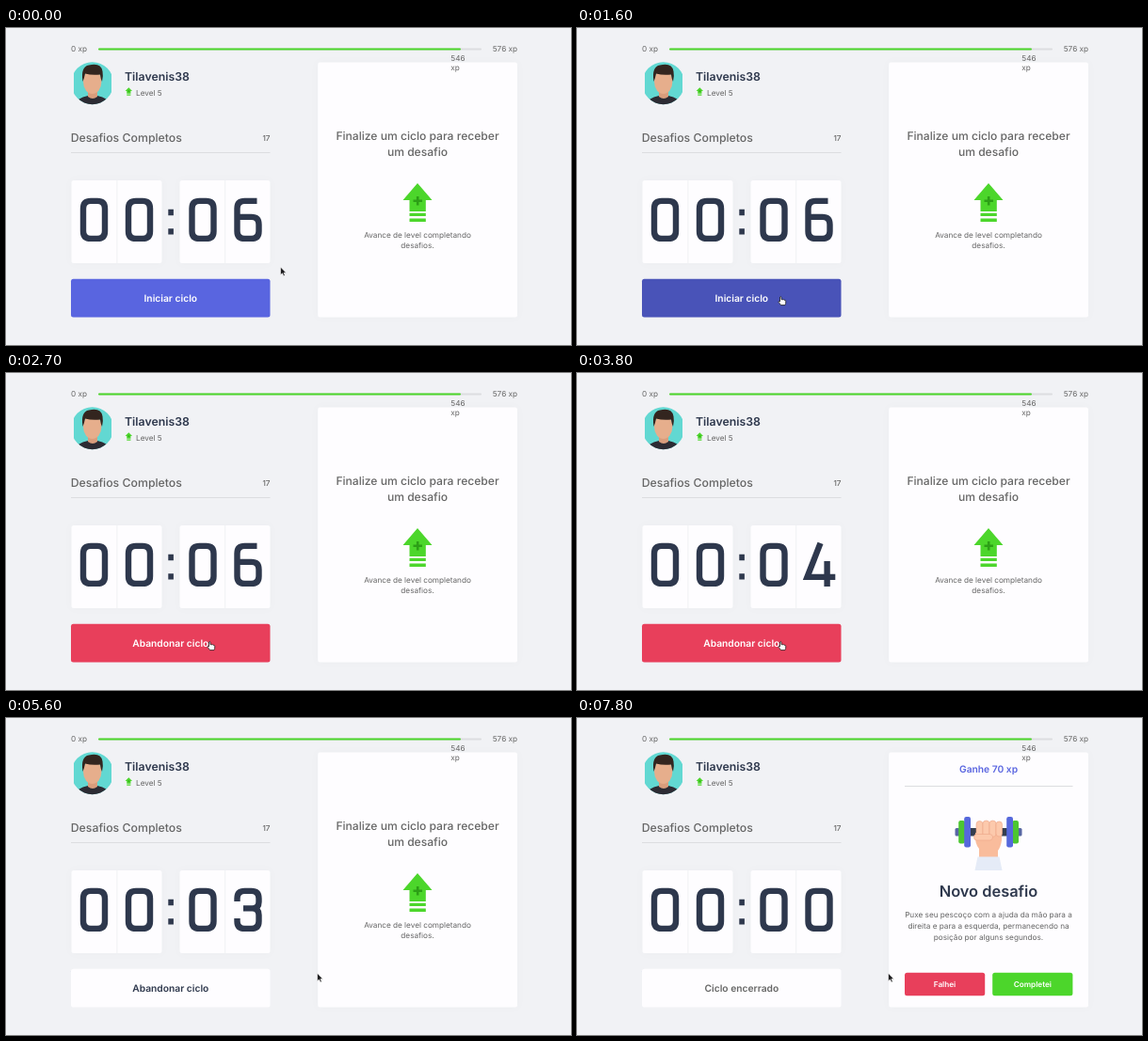
Animation of 600x337 px, one loop 8000 ms. Source, as an HTML page:

```html
<!DOCTYPE html>
<html lang="pt-BR">
<head>
<meta charset="utf-8">
<title>Ciclo</title>
<style>
  html, body { margin: 0; width: 100%; height: 100%; overflow: hidden; background: #f1f2f5; }
  svg { display: block; width: 600px; height: 337px; text-rendering: geometricPrecision; }
  text { font-family: Inter, sans-serif; font-size: 8.2px; fill: #666; }
  .mid { text-anchor: middle; }
  .end { text-anchor: end; }
  .big { font-size: 12.3px; font-weight: 500; }
  .bold { font-weight: 600; }
  .label { font-size: 10.25px; font-weight: 600; }
  .title { fill: #2e384d; font-weight: 600; }
  .white { fill: #fff; }
  .card { fill: #fefdff; filter: drop-shadow(0 0 5px rgba(0, 0, 0, .02)); }
  .line { stroke: #dcdde0; stroke-width: 1; }
  .digit { fill: none; stroke: #2e384d; stroke-width: 6.4; }
</style>
</head>
<body>
<svg viewBox="0 0 600 337">
  <defs>
    <g id="levelUp">
      <path fill="#4cd62b" d="M15.5 0 31 18H24.3V30H7V18H0ZM7 31.8H24.3V35H7ZM7 37.4H24.3V41H7Z"/>
      <path stroke="#2c9f16" stroke-width="2.6" d="M11 18.8H20.4M15.7 14.1V23.5"/>
    </g>
    <clipPath id="round"><circle cx="91.7" cy="58.7" r="22.5"/></clipPath>
  </defs>
  <rect width="600" height="337" fill="#f1f2f5"/>

  <text x="69" y="25">0 xp</text>
  <text x="543" y="25" class="end">576 xp</text>
  <rect x="98" y="21.4" width="407" height="2" rx="1" fill="#dcdde0"/>
  <rect x="98" y="21.4" width="385" height="2" rx="1" fill="#4cd62b"/>

  <g clip-path="url(#round)">
    <rect x="72" y="36" width="40" height="46" fill="#62d8d2"/>
    <path fill="#2c2b33" d="M74 82Q75 74 87 72H97Q109 74 110 82Z"/>
    <path fill="#d99d7c" d="M87 64H97V73Q92 77 87 73Z"/>
    <ellipse cx="91.7" cy="57" rx="9.7" ry="13" fill="#e6ae8c"/>
    <path fill="#33251f" d="M81.5 57Q79 41 88 39.5Q101 36.5 102.5 46Q103.5 51 102 57Q100.5 54 100 49.5Q91 50.5 84 48.5Q83 54 81.5 57Z"/>
  </g>
  <text x="126" y="56.2" class="title" style="font-size:12.3px">Tilavenis38</text>
  <use href="#levelUp" transform="translate(126.6 63.3) scale(.24 .205)"/>
  <text x="138" y="71.5">Level 5</text>

  <text x="68.7" y="121.3" class="big">Desafios Completos</text>
  <text x="280.5" y="120" class="end" style="font-weight:500">17</text>
  <path class="line" d="M69 132.5H280.5"/>

  <rect class="card" x="69.5" y="162" width="96" height="88" rx="2.5"/>
  <rect class="card" x="184.5" y="162" width="96" height="88" rx="2.5"/>
  <path stroke="#f0f1f3" d="M117.9 162V250M232.7 162V250"/>
  <path fill="#2e384d" d="M172.3 192.8H177.9V199.2H172.3ZM172.3 213.2H177.9V219.6H172.3Z"/>
  <g id="digits"></g>

  <rect id="btn" x="69" y="266.7" width="211.5" height="40.8" rx="2.5"/>
  <text id="btnText" x="174.8" y="290.7" class="mid label"></text>

  <rect class="card" x="331.2" y="36.5" width="211.8" height="271" rx="2.5"/>
  <g id="idle">
    <g class="mid" style="font-weight:500">
      <text x="437" y="119" style="font-size:12.1px">Finalize um ciclo para receber</text>
      <text x="437" y="136.2" style="font-size:12.1px">um desafio</text>
    </g>
    <use href="#levelUp" x="421.5" y="165"/>
    <text x="437" y="222.8" class="mid">Avance de level completando</text>
    <text x="437" y="234.2" class="mid">desafios.</text>
  </g>
  <g id="challenge">
    <text x="437" y="58.2" class="mid label" style="fill:#5965e0">Ganhe 70 xp</text>
    <path class="line" d="M348 72.5H526.5"/>
    <g>
      <rect x="401.5" y="117" width="5" height="8.5" rx="1.5" fill="#5966a5"/>
      <rect x="467.5" y="117" width="5" height="8.5" rx="1.5" fill="#5966a5"/>
      <rect x="416" y="117" width="42" height="8.5" fill="#343e4e"/>
      <rect x="405.2" y="109" width="6.8" height="24.5" rx="2.2" fill="#4cc631"/>
      <rect x="462.2" y="109" width="6.8" height="24.5" rx="2.2" fill="#4cc631"/>
      <rect x="411.2" y="105" width="6.8" height="32.5" rx="2.2" fill="#5668dc"/>
      <rect x="456.2" y="105" width="6.8" height="32.5" rx="2.2" fill="#5668dc"/>
      <path fill="#f9bc9c" d="M423 122H451V130Q450 137 447 141V150H427V139Q422 133 423 122Z"/>
      <g fill="#fcc9ac" stroke="#eda486" stroke-width=".6">
        <rect x="424" y="109.5" width="7" height="17" rx="3.5"/>
        <rect x="431" y="109" width="7" height="17.5" rx="3.5"/>
        <rect x="438" y="109" width="7" height="17.5" rx="3.5"/>
        <rect x="445" y="110" width="6.5" height="16" rx="3.2"/>
        <rect x="421.5" y="123.5" width="20" height="6.5" rx="3.2"/>
      </g>
      <path fill="#e5ebf7" d="M425.5 147.5H448.5L451.5 162H422.5Z"/>
    </g>
    <text x="437" y="190.2" class="mid title" style="font-size:16.4px">Novo desafio</text>
    <text x="437" y="211.7" class="mid">Puxe seu pescoço com a ajuda da mão para a</text>
    <text x="437" y="224" class="mid">direita e para a esquerda, permanecendo na</text>
    <text x="437" y="236.2" class="mid">posição por alguns segundos.</text>
    <rect x="348" y="270.7" width="85.2" height="24.5" rx="2.5" fill="#e83f5b"/>
    <rect x="441.2" y="270.7" width="85.2" height="24.5" rx="2.5" fill="#4cd62b"/>
    <text x="390.5" y="286" class="mid bold white">Falhei</text>
    <text x="483.8" y="286" class="mid bold white">Completei</text>
  </g>
  <text x="472.3" y="35">546</text>
  <text x="472.3" y="45">xp</text>

  <g id="arrow">
    <path fill="#1d1d1f" stroke="#fff" stroke-width=".6" d="M0 0V8.6L2 6.8L3.4 9.8L4.8 9.1L3.5 6.2H6Z"/>
  </g>
  <g id="hand">
    <path fill="#fff" stroke="#1d1d1f" stroke-width=".8" stroke-linejoin="round" d="M-.7 .7Q0 -.4 .8 .7V3.3Q2 2.7 2.5 3.6Q3.6 3.1 4 4Q5.3 3.6 5.5 5V7Q5.3 8.2 4.7 9.3H.3Q-.8 7.5 -2.3 5.9Q-2.3 4.7 -.7 5.6Z"/>
  </g>
</svg>
<script>
(() => {
  const LOOP = 8000;
  const $ = id => document.getElementById(id);

  // Centre lines of the numerals, around the middle of their cell
  const arch = 'V-12Q-11.5-20-3.5-20H3.5Q11.5-20 11.5-12';
  const bowl = 'V12Q11.5 20 3.5 20H-3.5Q-11.5 20-11.5 12';
  const glyphs = [
    'M-11.5 0' + arch + bowl + 'Z',
    'M-8.5-11.5L3.8-18.3V23',
    'M-11.5-9' + arch + 'V-9.5Q11.5-5 8-1.5L-10.3 16.5V20H13',
    'M-11.5-9' + arch + 'V-8.5Q11.5-1.5 4.5-1.5H-5M4.5-1.5Q11.5-1.5 11.5 5.5' + bowl + 'V9',
    'M1.5-23L-12.5 13H17.3M8.6-4V23',
    'M11-20H-9.5V-4H3.5Q11.5-4 11.5 4' + bowl + 'V9',
    'M9.5-20H-3.5Q-11.5-20-11.5-12V12Q-11.5 20-3.5 20H3.5Q11.5 20 11.5 12V5Q11.5-3 3.5-3H-11.5'
  ];
  const digits = [93.5, 141.5, 209, 257].map(x => {
    const p = document.createElementNS('http://www.w3.org/2000/svg', 'path');
    p.setAttribute('class', 'digit');
    p.setAttribute('transform', `translate(${x} 203.9)`);
    p.setAttribute('d', glyphs[0]);
    return $('digits').appendChild(p);
  });

  const ticks = [2900, 3800, 4800, 5700, 6600, 7500];
  const blue = [89, 101, 224], dark = [73, 83, 184], red = [232, 63, 91];
  const paper = [254, 253, 255], white = [255, 255, 255], ink = [46, 56, 77], grey = [102, 102, 102];

  const span = (t, a, b) => Math.min(1, Math.max(0, (t - a) / (b - a)));
  const smooth = k => k * k * (3 - 2 * k);
  const mix = (a, b, k) => a.map((v, i) => v + (b[i] - v) * k);
  const rgb = c => `rgb(${c.map(Math.round)})`;
  const show = (el, on) => el.setAttribute('display', on ? 'inline' : 'none');

  function pointer(t) {
    const start = [291.5, 254], press = [216.2, 285.3], rest = [330.5, 271.2];
    return t < 4000
      ? mix(start, press, smooth(span(t, 950, 1600)))
      : mix(press, rest, smooth(span(t, 5030, 5540)));
  }

  function buttonColors(t) {
    if (t >= 7500) return [paper, grey];
    if (t < 1800) return [mix(blue, dark, span(t, 1270, 1470)), white];
    if (t < 5000) return [mix(dark, red, span(t, 1770, 1990)), white];
    const k = span(t, 5320, 5560);
    return [mix(red, paper, k), mix(white, ink, k)];
  }

  function draw(t) {
    const left = 6 - ticks.filter(at => t >= at).length;
    const done = left === 0;
    digits[3].setAttribute('d', glyphs[left]);

    const [back, front] = buttonColors(t);
    $('btn').setAttribute('fill', rgb(back));
    $('btnText').style.fill = rgb(front);
    $('btnText').textContent = done ? 'Ciclo encerrado' : t < 1800 ? 'Iniciar ciclo' : 'Abandonar ciclo';
    show($('idle'), !done);
    show($('challenge'), done);

    const over = t >= 1270 && t < 5360;
    const [x, y] = pointer(t);
    for (const [id, on] of [['arrow', !over], ['hand', over]]) {
      $(id).setAttribute('transform', `translate(${x} ${y})`);
      show($(id), on);
    }
  }

  const begin = performance.now();
  function frame() {
    draw((performance.now() - begin) % LOOP);
    requestAnimationFrame(frame);
  }
  frame();
})();
</script>
</body>
</html>
```
